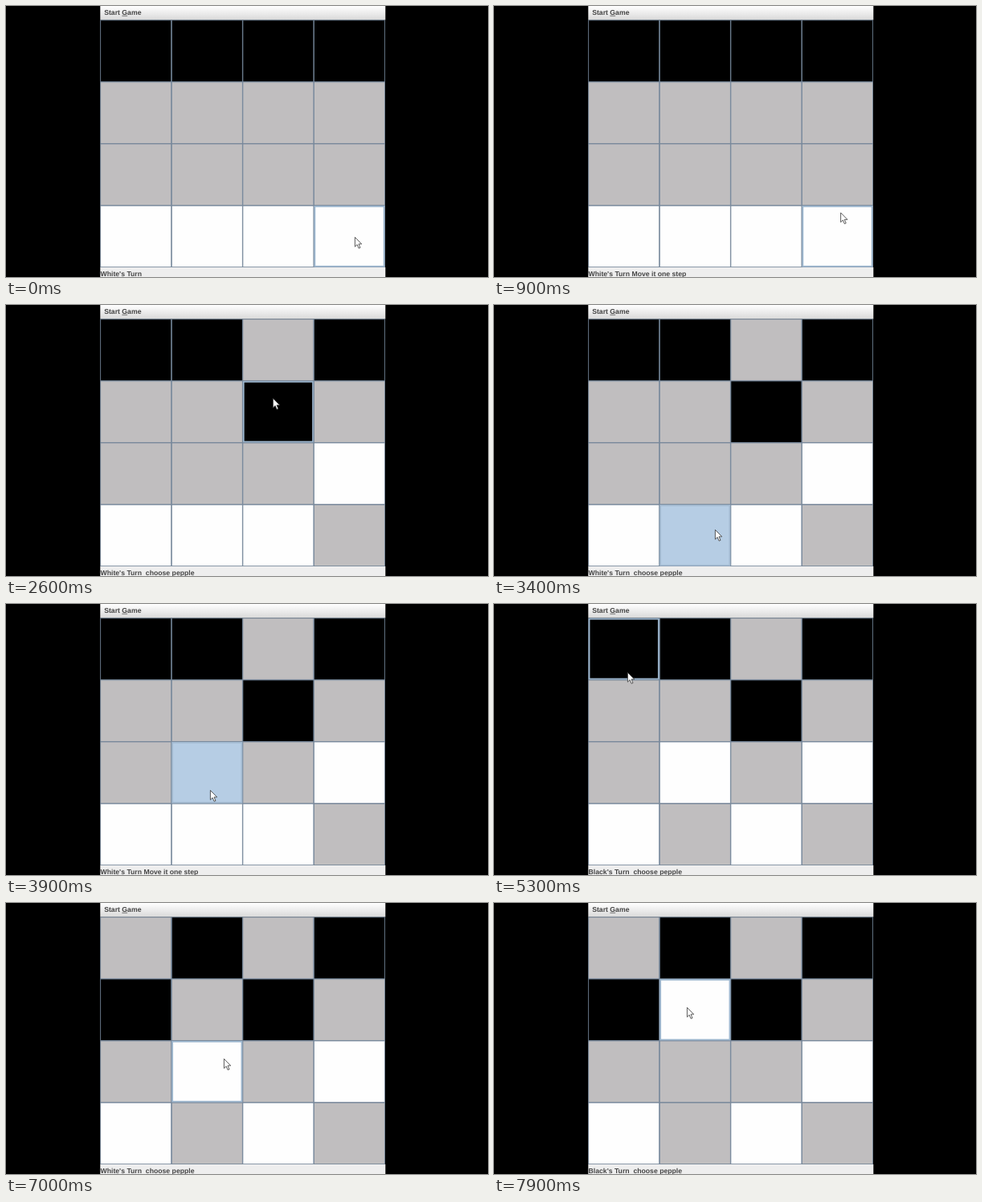
An HTML page that plays this animation: 600 by 338 pixels, repeating every 8 s.

```html
<!DOCTYPE html>
<html lang="en">
<head>
<meta charset="utf-8">
<title>Board game</title>
<style>
  html, body { margin: 0; width: 100%; height: 100%; overflow: hidden; background: #000; }
  svg { display: block; width: 600px; height: 338px; }
  text {
    font: bold 8.68px "Liberation Sans", Arial, sans-serif;
    fill: #444; white-space: pre; text-rendering: geometricPrecision;
  }
</style>
</head>
<body>
<svg viewBox="0 0 600 338">
  <defs>
    <linearGradient id="bar" x2="0" y2="1">
      <stop offset="0" stop-color="#fff"/>
      <stop offset="1" stop-color="#d9d9d9"/>
    </linearGradient>
  </defs>
  <rect width="600" height="338"/>
  <rect x="117.3" width="355" height="17.5" fill="url(#bar)"/>
  <rect x="117.3" y="325.9" width="355" height="12.1" fill="#eee"/>
  <rect x="117.4" y="17.5" width="354.4" height="308.4" fill="#7a8a99"/>
  <text x="122.2" y="11.1">Start Game</text>
  <path d="M144.4 12.3h6.8" stroke="#555" stroke-width=".8"/>
  <g id="board"></g>
  <text id="status" x="117.5" y="336.8"></text>
  <path id="cursor" d="M.4.4V12.2L3.1 9.6 5.1 14.2 7 13.4 5 8.9H8.7Z"
        fill="#fff" stroke="#333" stroke-width=".8" stroke-linejoin="round"/>
</svg>
<script>
const LOOP = 8000, STEP = 100;
const X0 = 117.4, Y0 = 17.5, W = 88.6, H = 77.1, LINE = 0.7;
const FILL = { b: '#000', w: '#fefefe', '-': '#c0bebf' };
const START = 'bbbb--------wwww';

// where the mouse goes: x, y, arrival and, for a click, the time of the press
const stop = (x, y, arrive, press) =>
  ({ x, y, arrive, press, leave: press ? press + STEP : arrive });
const STOPS = [
  stop(434, 288, 0, 700),
  stop(429, 233, 1100, 1100),
  stop(317, 55, 1700, 2100),
  stop(332, 116, 2500, 2500),
  stop(398, 208, 3100),
  stop(275, 280, 3400, 3400),
  stop(254, 232, 3900, 3900),
  stop(240, 122, 4700),
  stop(166, 85, 5300, 5500),
  stop(167, 114, 5800, 5800),
  stop(271, 194, 6800, 7300),
  stop(240, 130, 7800, 7800)
];
const CLICKS = STOPS.filter(s => s.press);

const byId = id => document.getElementById(id);
const status = byId('status'), cursor = byId('cursor');

function addRect(col, row, inset, stroke, width) {
  const r = document.createElementNS('http://www.w3.org/2000/svg', 'rect');
  const attrs = {
    x: X0 + col * W + inset, y: Y0 + row * H + inset,
    width: W - 2 * inset, height: H - 2 * inset,
    fill: 'none', stroke, 'stroke-width': width
  };
  for (const k in attrs) r.setAttribute(k, attrs[k]);
  byId('board').append(r);
  return r;
}

const cells = [...START].map((_, i) => addRect(i % 4, i >> 2, LINE / 2, '#74869a', LINE));
const rings = cells.map((_, i) => addRect(i % 4, i >> 2, 1.2, '#9db7cf', 1.7));

const cellAt = ({ x, y }) => Math.floor((y - Y0) / H) * 4 + Math.floor((x - X0) / W);
const easeOut = u => 1 - (1 - u) ** 2;

function cursorAt(t) {
  const next = STOPS.findIndex(s => s.leave > t);
  if (next < 1) return STOPS.at(next);
  const a = STOPS[next - 1], b = STOPS[next];
  const k = easeOut(Math.min(1, (t - a.leave) / (b.arrive - a.leave)));
  return { x: a.x + (b.x - a.x) * k, y: a.y + (b.y - a.y) * k };
}

// replay the clicks released so far
function gameAt(t) {
  const board = [...START];
  let white = true, from = -1, hint = '';
  for (const click of CLICKS) {
    if (click.leave > t) break;
    const cell = cellAt(click);
    if (from < 0) {
      from = cell;
      hint = ' Move it one step';
    } else {
      board[cell] = board[from];
      board[from] = '-';
      from = -1;
      white = !white;
      hint = '  choose pepple';
    }
  }
  return { board, text: (white ? 'White' : 'Black') + "'s Turn" + hint };
}

function draw(now) {
  const t = Math.floor(now % LOOP / STEP) * STEP;
  const pos = cursorAt(t), hover = cellAt(pos);
  const pressed = CLICKS.some(c => c.press === t);
  const { board, text } = gameAt(t);
  cells.forEach((cell, i) => {
    const over = i === hover;
    cell.setAttribute('fill', over && pressed ? '#b6cde4' : FILL[board[i]]);
    rings[i].setAttribute('visibility', over ? 'visible' : 'hidden');
    rings[i].setAttribute('stroke', pressed ? '#a3bad1' : '#9db7cf');
  });
  status.textContent = text;
  cursor.setAttribute('transform', `translate(${pos.x} ${pos.y})`);
}

const begin = performance.now();
function tick() {
  draw(performance.now() - begin);
  requestAnimationFrame(tick);
}
tick();
</script>
</body>
</html>
```
